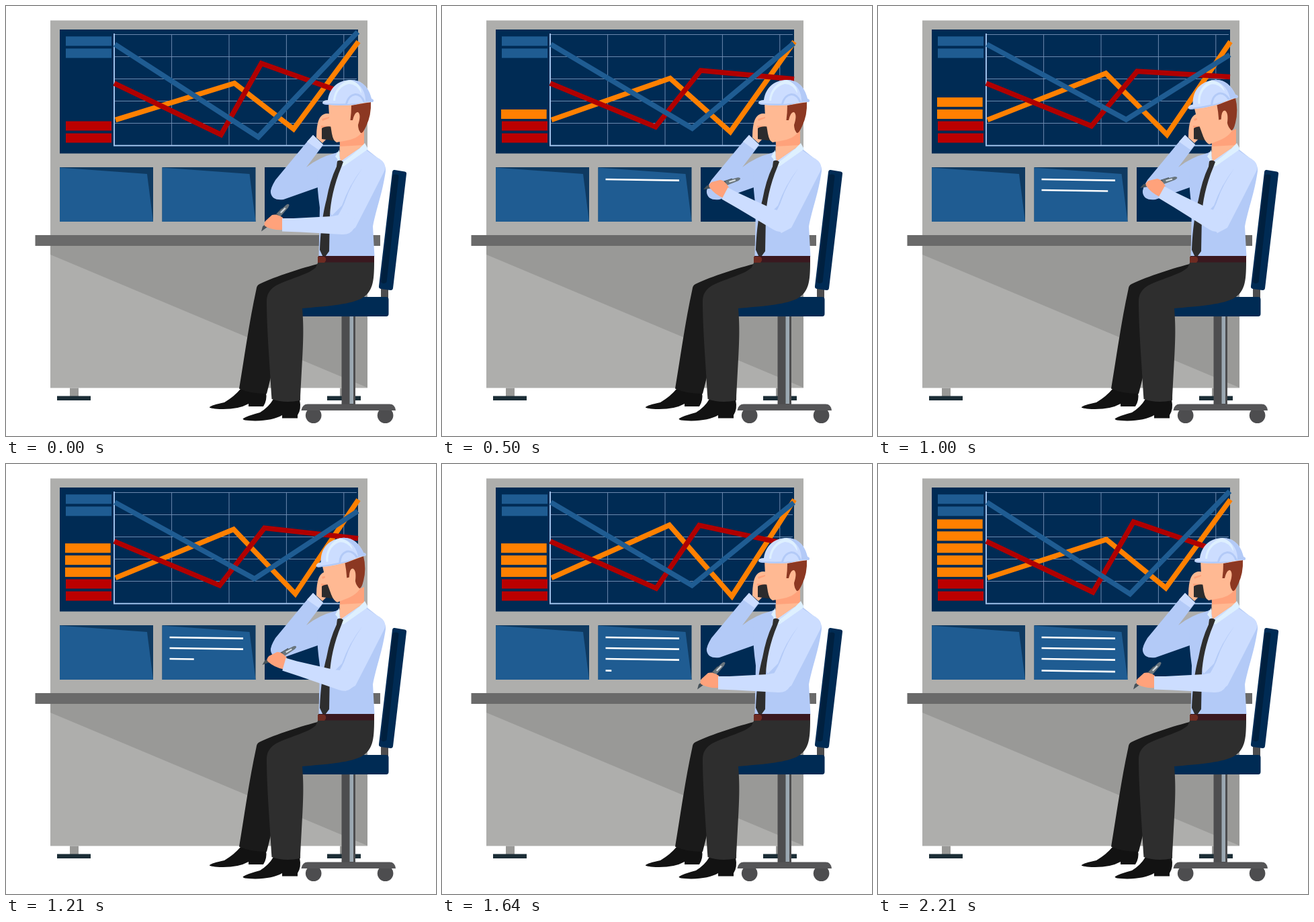
Recreate the animation shown at these times as an HTML page with a canvas. Size 640x640 px, loop 2.28 s.

```html
<!DOCTYPE html>
<html lang="en">
<head>
<meta charset="utf-8">
<title>Control desk</title>
<style>
html, body { margin: 0; width: 100%; height: 100%; overflow: hidden; background: #fff; }
canvas { display: block; width: 100%; height: 100%; }
</style>
</head>
<body>
<canvas id="stage" width="640" height="640"></canvas>
<script>
const ctx = document.getElementById('stage').getContext('2d');
const LOOP = 2280;
const RAD = Math.PI / 180;

const NAVY = '#002b54', BLUE = '#1f5c92', ORANGE = '#ff8000', RED = '#b00000';
const SHIRT = '#ccddff', SHADE = '#b3caf7', PALE = '#def0ff';
const SKIN = '#ffb993', SKIN2 = '#ffa27b', DARK = '#2e2e2e', STEEL = '#4d4d4f';

function rect(color, x, y, w, h) {
  ctx.fillStyle = color;
  ctx.fillRect(x, y, w, h);
}

function shape(color, d) {
  ctx.fillStyle = color;
  ctx.fill(new Path2D(d));
}

function stroke(color, width, d) {
  ctx.strokeStyle = color;
  ctx.lineWidth = width;
  ctx.stroke(new Path2D(d));
}

function disc(color, x, y, r) {
  ctx.fillStyle = color;
  ctx.beginPath();
  ctx.arc(x, y, r, 0, 7);
  ctx.fill();
}

function turned(deg, x, y, draw) {
  ctx.save();
  ctx.translate(x, y);
  ctx.rotate(deg * RAD);
  ctx.translate(-x, -y);
  draw();
  ctx.restore();
}

// Linear interpolation through [time, value] stops
function track(t, stops) {
  for (let i = 1; i < stops.length; i++) {
    const [t0, a] = stops[i - 1], [t1, b] = stops[i];
    if (t <= t1) return t <= t0 ? a : a + (b - a) * (t - t0) / (t1 - t0);
  }
  return stops[stops.length - 1][1];
}

// Rises to 1 at the peak time, then falls back by the loop end
const sway = (t, peak) => track(t, [[0, 0], [peak, 1], [LOOP, 0]]);

function drawConsole() {
  rect('#aeaeac', 66, 21.5, 472, 547);
  shape('#999997', 'M66 357H538V568L66 370Z');
  rect('#999997', 95, 568.5, 13, 13);
  rect('#999997', 497, 568.5, 13, 13);
  rect('#1b2d36', 76, 580.5, 50, 6.5);
  rect('#1b2d36', 478, 580.5, 50, 6.5);
  rect('#6a6a6a', 43.5, 341, 513.5, 16);
  rect(NAVY, 80, 35, 444, 184.5);
  for (const x of [80, 232.5]) {
    rect('#0f3a61', x, 240, 139, 81);
    shape(BLUE, `M${x} 240.5l130 9.5l9 71h-139Z`);
  }
  rect(NAVY, 385, 240, 139, 81);
}

function drawChart(t) {
  for (let i = 0; i < 5; i++) stroke('#7893b8', 0.9, `M161 ${42.5 + 33 * i}H522`);
  for (let i = 1; i < 5; i++) stroke('#7893b8', 0.9, `M${161.2 + 85.4 * i} 42V207`);
  stroke('#9fc0ea', 2, 'M161 41V207.7H523');

  for (const y of [45, 63]) rect(BLUE, 89, y + 0.3, 68, 14);
  for (const y of [171.5, 189.5]) rect('#bb0000', 89, y, 68, 14);
  [400, 830, 1180, 1680, 1900].forEach((start, i) => {
    if (t >= start) rect(ORANGE, 88, 154 - 17.9 * i, 67.7, 14);
  });

  const o = sway(t, 1650), r = sway(t, 694), b = sway(t, 1062);
  ctx.lineJoin = 'miter';
  stroke(ORANGE, 7.6, `M163 169.5L${340 - 1.6 * o} ${115 - 24.2 * o}L${428 + 3.5 * o} ${183 + 14 * o}L524.5 53`);
  stroke(RED, 7.6, `M161 115L${320 - 3 * r} ${191.5 - 16 * r}L${380 + 7 * r} ${85.5 + 14.5 * r}L524 ${137 - 39 * r}`);
  stroke(BLUE, 7.6, `M162 57L${375.5 - 6.5 * b} ${195 - 27.5 * b}L523.5 ${38.5 + 36 * b}`);
}

function drawNotes(t) {
  [[60, 258], [606, 274], [1066, 290], [1606, 307.5]].forEach(([start, y]) => {
    const p = track(t, [[start, 0], [start + 438, 1]]);
    if (p > 0) stroke('#fff', 2.6, `M243.5 ${y}l${109.5 * p} ${1.6 * p}`);
  });
}

function drawChair() {
  rect(STEEL, 558, 418, 11, 18);
  shape(NAVY, 'M578.5 244L593.5 246.5Q596.5 247 596 250L576 420Q575.5 423.5 572 423L558 421Q554.500 420.500 555 417L575 247Q575.500 243.500 578.500 244Z');
  shape('#00203f', 'M576 251Q585 249 584.500 254L566.500 411Q562 415 558 411Z');
  rect(STEEL, 499.5, 460, 20.500, 134);
  rect('#9ba8b2', 511.500, 460, 5.500, 132);
  shape(NAVY, 'M430 433H566Q569.500 433 569.500 437V458Q569.500 462 566 462H430Z');
  disc(STEEL, 457.7, 609.3, 11.8);
  disc(STEEL, 564.6, 609.3, 11.8);
  shape('#555557', 'M439.500 602Q441 592.500 449 592.500H571Q579 592.500 580 602Z');
}

function drawLegs() {
  shape('#121212', 'M303 597Q306 594 325 590Q340 581 349 570L387 575Q389 587 383 596H361V592Q345 601 318 600Q302 599 303 597Z');
  shape('#1a1a1a', 'M468 383C440 390 402 402 377 414Q373 416 372.500 422C362 470 355 522 347 569.500Q363 577 388 577L394 553L450 410Z');
  shape('#121212', 'M353 614Q359 610 378 605Q391 597 398 585L437 586Q440 600 434 609V613.500H411V609Q397 617 371 617.500Q350 617 353 614Z');
  shape(DARK, 'M465 380H548C548 411 546 426 528 436C508 445 475 447 441 450C444 490 442 505 438 587Q415 592 395.500 585C393 540 388 480 388 441Q387 425 402 416C424 405 452 399 461 389Z');
}

function drawPhoneArm() {
  shape(SKIN, 'M462 196Q462 171 469 164Q475 158 483 161L490 178L479 196L471 204Z');
  shape(SKIN2, 'M470 168L481 165V167L471 171ZM469 178L481 179V181H469Z');
  shape('#2b2b2d', 'M470 182Q476 178 487 180L492 201L470 198Z');
  shape(SHADE, 'M457 192L472 207L447 240Q466 225 490 219L490 262L464 270L413 288Q396 290 394 278Q393 272 401 259L449 201Z');
  shape(SHIRT, 'M457 192L472 206L465 214L448 202Z');
}

function drawTorso() {
  shape(SHADE, 'M494 217L470 230Q463 237 463 250Q463 272 467 300L465.500 373H548.500L546 328C552 298 560 280 565 246Q566 234 553 226L534 211Z');
  shape(SHIRT, 'M494 219L532 212L553 226Q566 232 564 244Q550 272 520 330L505 338L490 318Q501 302 506 287Q512 268 530 242Q511 266 500 297L485 312L478 300L492 236Z');
  shape(SKIN2, 'M496.500 198L533 183V206L498 231Z');
  shape(SKIN, 'M496.500 209L533 207L498 231L496.500 223Z');
  shape(PALE, 'M496 214V231L490 224ZM497 235Q517 222 534 204L539 213L502 239Z');
  shape(DARK, 'M493 231Q498 228 502 232L499 240C488 266 483 292 482 312L481 365L473 376L467 363C468 334 472 306 477 288Q482 260 492 239Z');
  rect('#3a181f', 465, 372, 83, 9.500);
  shape('#6e2b22', 'M464 373H473Q477 374 476 379L474 382H464Z');
}

function drawHead() {
  shape(SKIN, 'M480 144L540 143L532 184Q527 196 508 200L492 203Q487 201 485 190L481 165Z');
  shape('#8c3822', 'M514 148L543 143Q544 162 536 179Q531 190 528 189Q524 184 524 177Q529 162 524 158Q519 157 516 170H512.500Q514 159 514 148Z');
  shape(SHIRT, 'M471 144Q472 140 479 140C482 120 496 110 513 110C530 110 540 121 544 138Q549 140 546 143Q535 143 518 147Q497 149 481 147Q471 147 471 144Z');
  shape(SHADE, 'M513 110C530 110 540 121 544 138Q549 140 546 143Q540 142 535 143C536 127 527 115 513 110ZM471 144Q500 148 546 142Q530 144 518 147Q497 149 481 147Q471 147 471 144Z');
  shape(PALE, 'M487 141C488 125 499 113 513 110Q529 116 529 130Q521 115 510 116C498 119 491 129 490 141Z');
  shape(SHADE, 'M505 146Q508 132 520 130Q530 130 535 143Z');
  shape(SHIRT, 'M508 146Q511 134 520 133Q528 133 532 144Z');
}

function drawForearm() {
  shape('#46525a', 'M380 335.500L382 328L390 322L410 301L414 305L393 326Z');
  shape('#69757d', 'M403 309L417 296Q421 293.500 421.500 296.500L420 300L408 314Z');
  shape('#d5dde2', 'M408 307L415 300L416.500 301.500L409.500 308.500Z');
  shape(SKIN2, 'M412 315V333Q398 334 388 329Q382 327 386 320L396 311Q403 309 412 315Z');
  shape(SHIRT, 'M411 316H428L485 313L511 308Q524 316 518 331Q512 341 500 340L438 336.500L411 335.500Z');
}

function draw(t) {
  rect('#fff', 0, 0, 640, 640);
  drawConsole();
  drawChart(t);
  drawNotes(t);
  drawChair();
  drawLegs();
  drawPhoneArm();
  drawTorso();
  turned(track(t, [[500, 0], [870, -11], [1210, -11], [1600, 0]]), 507, 197, drawHead);
  turned(track(t, [[50, 0], [760, 43.7], [1470, 0]]), 511, 322.4, drawForearm);
}

const begin = performance.now();
function tick() {
  draw((performance.now() - begin) % LOOP);
  requestAnimationFrame(tick);
}
tick();
</script>
</body>
</html>
```
